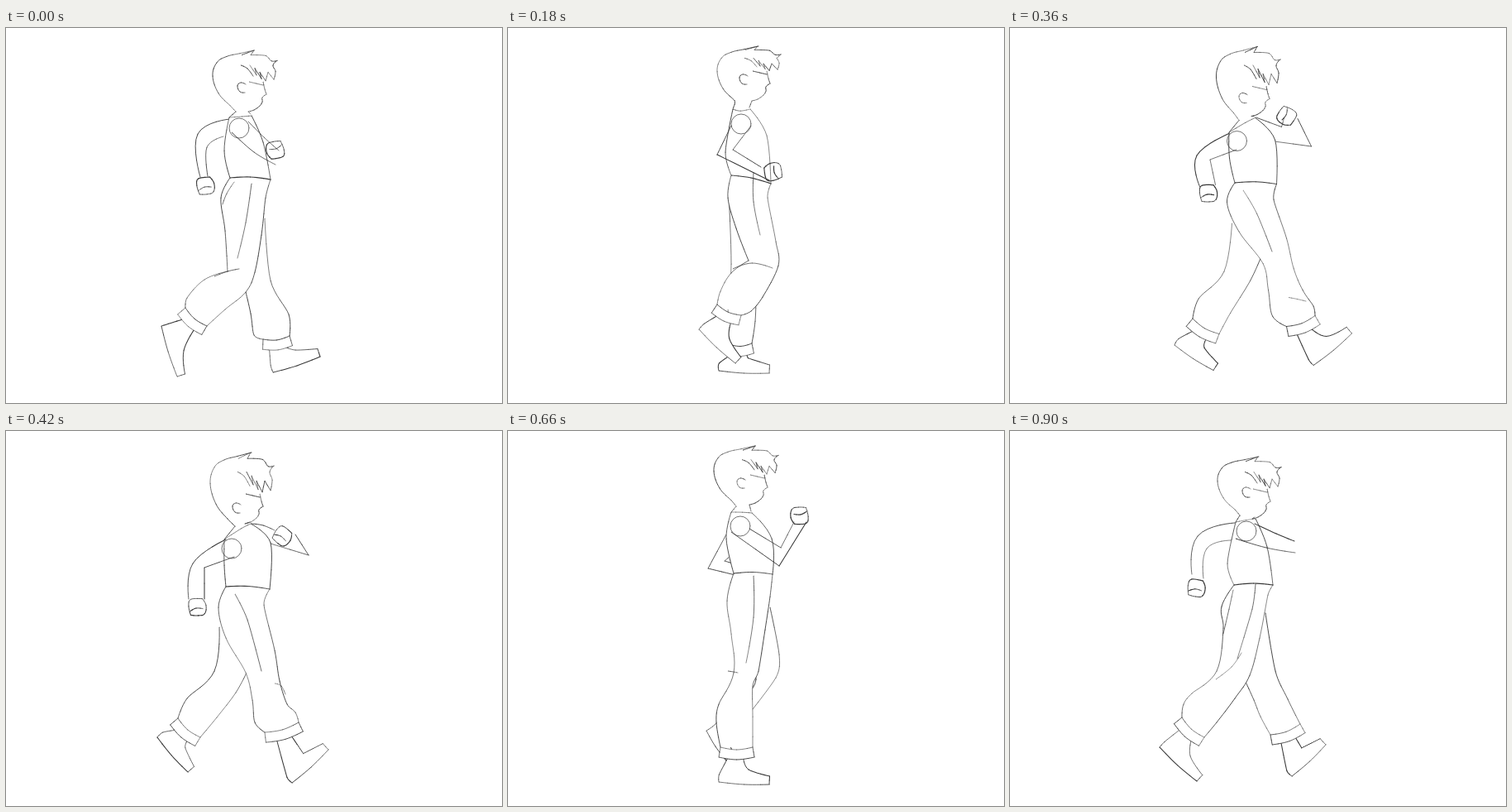
An HTML page with a canvas that plays this animation: 600x453 px, repeating every 0.96 s.

```html
<!DOCTYPE html>
<html lang="en">
<head>
<meta charset="utf-8">
<title>Walk cycle</title>
<style>
html, body { margin: 0; width: 100%; height: 100%; overflow: hidden; background: #fff; }
canvas { display: block; }
</style>
</head>
<body>
<canvas id="stage" width="600" height="453"></canvas>
<script>
const STEP = 60, STEPS = 16;
const poses = [];
const pose = (step, parts) => poses.push({ step, parts });

// head: face x, face y, hair top, skull left, nape x, nape y, ear x, ear y
// shoes: heel, toe; the other parts are x, y pairs along a line
pose(0, {
  head: [0, 0, 27, 250, 278, 101, 285, 72],
  back: [270, 108, 264, 148, 271, 181], chest: [297, 106, 311, 138, 320, 183],
  shoulder: [282, 121],
  nearIn: [293, 113, 312, 132, 330, 148], nearOut: [273, 126, 300, 150, 326, 165], nearHand: [326, 147],
  farIn: [263, 131, 243, 144, 244, 179], farOut: [271, 110, 232, 128, 235, 180], farHand: [241, 191],
  nearBack: [260, 205, 265, 245, 268, 294, 240, 304, 219, 326, 217, 338],
  nearFront: [314, 205, 309, 250, 301, 295, 290, 319, 265, 340, 243, 360],
  farBack: [290, 319, 296, 345, 300, 371, 311, 376],
  farFront: [313, 230, 320, 305, 342, 346, 343, 372],
  nearShoe: [188, 360, 207, 421], farShoe: [323, 416, 380, 397],
  crease: [297, 188, 290, 235, 280, 278], fold: [252, 300, 268, 294, 282, 291],
  pocket: [276, 186, 267, 200, 262, 213]
});
pose(3, {
  head: [2, -13, 22, 253, 273, 95, 285, 62],
  back: [272, 98, 263, 150, 270, 178], chest: [293, 98, 313, 130, 318, 188],
  shoulder: [282, 116],
  nearIn: [294, 118, 272, 147, 306, 168], nearOut: [270, 118, 253, 153, 316, 184], nearHand: [321, 174],
  farIn: [285, 120, 276, 148, 290, 160], farOut: [272, 120, 266, 150, 285, 172], farHand: [302, 169],
  nearBack: [266, 205, 276, 242, 291, 281, 270, 296, 257, 318, 253, 334],
  nearFront: [314, 205, 324, 258, 327, 287, 308, 325, 294, 342, 282, 347],
  farBack: [267, 200, 270, 285, 266, 345, 267, 382],
  farFront: [300, 250, 300, 320, 299, 354, 295, 381],
  nearShoe: [231, 364, 275, 405], farShoe: [255, 414, 316, 417],
  crease: [297, 175, 297, 210, 305, 250], fold: [272, 291, 295, 284, 320, 290]
});
pose(5, {
  head: [2, 0, 19, 252, 277, 108, 285, 76],
  back: [266, 121, 267, 152, 278, 186], chest: [297, 105, 321, 135, 326, 186],
  shoulder: [276, 131],
  nearIn: [272, 142, 244, 153, 257, 176], nearOut: [264, 124, 226, 148, 238, 180], nearHand: [248, 187],
  farIn: [298, 104, 346, 125, 338, 98], farOut: [320, 138, 363, 136, 346, 94], farHand: [335, 85],
  nearBack: [268, 208, 288, 242, 322, 277, 327, 308, 334, 344, 356, 357],
  nearFront: [326, 205, 344, 243, 355, 278, 368, 303, 384, 332, 384, 343],
  farBack: [279, 235, 266, 298, 238, 330, 234, 355],
  farFront: [316, 262, 303, 295, 278, 343, 271, 369],
  nearShoe: [388, 390, 437, 353], farShoe: [215, 396, 272, 415],
  crease: [287, 195, 305, 220, 325, 250], fold: [349, 346, 362, 347, 378, 342]
});
pose(7, {
  head: [-4, 11, 26, 247, 277, 115, 279, 93],
  back: [264, 131, 264, 162, 266, 188], chest: [296, 112, 320, 135, 319, 191],
  shoulder: [273, 142],
  nearIn: [276, 152, 240, 165, 240, 203], nearOut: [266, 131, 226, 160, 221, 203], nearHand: [231, 213],
  farIn: [297, 112, 311, 114, 325, 120], farOut: [320, 136, 366, 150, 350, 125], farHand: [334, 127],
  nearBack: [257, 213, 266, 250, 290, 292, 298, 325, 301, 352, 313, 364],
  nearFront: [312, 210, 325, 265, 331, 302, 340, 330, 350, 340, 354, 352],
  farBack: [258, 237, 252, 290, 219, 323, 208, 347],
  farFront: [292, 290, 278, 316, 255, 346, 235, 370],
  nearShoe: [346, 425, 390, 385], farShoe: [183, 370, 220, 412],
  crease: [277, 197, 292, 228, 309, 290], fold: [325, 305, 333, 308, 338, 318]
});
pose(11, {
  head: [-1, -12, 18, 249, 276, 91, 282, 63],
  back: [270, 98, 264, 130, 273, 172], chest: [295, 99, 319, 130, 320, 173],
  shoulder: [281, 115],
  nearIn: [292, 118, 330, 141, 346, 110], nearOut: [270, 122, 328, 163, 361, 110], nearHand: [353, 102],
  farIn: [270, 150, 262, 157, 272, 160], farOut: [264, 125, 242, 166, 275, 174], farHand: [290, 160],
  nearBack: [265, 205, 270, 245, 273, 292, 255, 330, 252, 352, 257, 382],
  nearFront: [317, 200, 311, 240, 303, 290, 296, 308, 296, 345, 296, 382],
  farBack: [290, 270, 300, 300, 285, 322, 268, 335],
  farFront: [317, 213, 328, 270, 324, 298, 285, 350],
  nearShoe: [255, 424, 316, 427], farShoe: [240, 362, 264, 398],
  crease: [297, 175, 297, 225, 288, 280], fold: [266, 290, 273, 291, 278, 292]
});
pose(13, {
  head: [0, -6, 17, 252, 277, 97, 284, 70],
  back: [268, 105, 266, 145, 271, 178], chest: [297, 103, 313, 134, 322, 174],
  shoulder: [284, 117],
  nearIn: [296, 106, 330, 113, 326, 100], nearOut: [275, 128, 350, 132, 343, 98], nearHand: [331, 95],
  farIn: [268, 130, 235, 138, 219, 160], farOut: [267, 109, 222, 128, 208, 149], farHand: [209, 161],
  nearBack: [260, 210, 264, 245, 256, 290, 238, 318, 222, 342, 220, 366],
  nearFront: [316, 195, 306, 245, 296, 282, 270, 328, 257, 355, 254, 375],
  farBack: [300, 272, 321, 305, 325, 336, 341, 366],
  farFront: [318, 213, 345, 265, 356, 320, 373, 351],
  nearShoe: [209, 409, 265, 426], farShoe: [376, 404, 417, 366],
  crease: [298, 177, 295, 220, 283, 278], fold: [248, 297, 262, 299, 284, 292],
  pocket: [271, 183, 263, 200, 263, 212]
});
pose(15, {
  head: [0, 5, 31, 251, 278, 102, 286, 74],
  back: [273, 110, 263, 160, 271, 186], chest: [297, 106, 311, 140, 318, 186],
  shoulder: [286, 121],
  nearIn: [296, 112, 322, 124, 344, 133], nearOut: [273, 130, 310, 141, 345, 147],
  farIn: [268, 132, 238, 142, 234, 178], farOut: [272, 111, 227, 127, 220, 173], farHand: [225, 190],
  nearBack: [256, 212, 258, 238, 250, 290, 220, 317, 210, 330, 208, 346],
  nearFront: [312, 198, 302, 250, 290, 295, 272, 323, 250, 352, 235, 370],
  farBack: [285, 303, 295, 325, 303, 345, 315, 367],
  farFront: [309, 220, 321, 290, 336, 324, 351, 354],
  nearShoe: [181, 382, 226, 423], farShoe: [341, 417, 382, 379],
  crease: [297, 185, 293, 215, 275, 275], fold: [249, 300, 268, 285, 280, 268],
  pocket: [270, 192, 265, 215, 258, 245]
});

// Shared head shapes; hair heights are percentages.
const SKULL = [50, 0, 33, 5, 17, 10, 5, 20, 0, 42, 7, 70, 21, 90];
const FRINGE = [285, 14, 300, 0, 296, 14, 314, 16, 321, 32, 328, 31, 323, 45, 326, 64, 324, 88,
  317, 66, 314, 92, 307, 66, 309, 86, 301, 54, 303, 75, 295, 45];
const LOCK = [284, 45, 292, 55, 299, 78];
const FACE = [311, 65, 313, 74, 315, 80, 310, 84, 310, 89, 307, 94, 300, 99, 293, 101];
const EAR = [4, 6, -2, 5, -5, -2, -1, -6, 5, -4];
const FIST = [-10, -7, -2, -11, 8, -9, 10, -1, 9, 8, -2, 10, -10, 7, -10, -7];
const THUMB = [2, -7, 1, 1, 4, 8];

const lerp = (a, b, u) => a + (b - a) * u;
const mix = (p, q, u) => [lerp(p[0], q[0], u), lerp(p[1], q[1], u)];
const add = (p, d, k = 1) => [p[0] + d[0] * k, p[1] + d[1] * k];
const dist = (a, b) => Math.hypot(b[0] - a[0], b[1] - a[1]) || 1;
const unit = (a, b) => [(b[0] - a[0]) / dist(a, b), (b[1] - a[1]) / dist(a, b)];
const last = list => list[list.length - 1];
const pairs = (flat, place = (x, y) => [x, y]) => {
  const out = [];
  for (let i = 0; i < flat.length; i += 2) out.push(place(flat[i], flat[i + 1]));
  return out;
};

// Smooth curve through the points; sharp turns stay corners.
function smooth(pts) {
  const tangent = i => {
    const a = pts[i - 1], b = pts[i], c = pts[i + 1];
    if (!a || !c) return [0, 0];
    const d = unit(a, b), e = unit(b, c);
    if (d[0] * e[0] + d[1] * e[1] < 0.35) return [0, 0];
    const k = Math.min(dist(a, b), dist(b, c)) * 1.2, t = unit(a, c);
    return [t[0] * k, t[1] * k];
  };
  const out = [pts[0]];
  for (let i = 0; i < pts.length - 1; i++) {
    const m = tangent(i), n = tangent(i + 1);
    for (let j = 1; j <= 8; j++) {
      const t = j / 8;
      const p = mix(pts[i], pts[i + 1], t * t * (3 - 2 * t));
      out.push(add(add(p, m, t * (1 - t) ** 2), n, -t * t * (1 - t)));
    }
  }
  return out;
}

const ctx = document.getElementById('stage').getContext('2d');
ctx.lineCap = ctx.lineJoin = 'round';
ctx.strokeStyle = '#383838';

// Pencil line with gently varying pressure.
function ink(pts, width = 0.85) {
  const line = smooth(pts);
  for (let i = 0; i < line.length - 1; i += 4) {
    ctx.lineWidth = width * (0.88 + 0.2 * Math.sin(i * 0.13 + pts[0][0]));
    ctx.beginPath();
    line.slice(i, i + 5).forEach(p => ctx.lineTo(...p));
    ctx.stroke();
  }
}

function blank(...sides) {
  ctx.fillStyle = '#fff';
  ctx.beginPath();
  sides.flatMap(smooth).forEach(p => ctx.lineTo(...p));
  ctx.fill();
}

function leg(back, front, [heel, toe]) {
  const b = last(back), f = last(front), e = unit(b, f);
  const down = [-e[1] * 12, e[0] * 12], mid = mix(b, f, 0.5), ankle = add(mid, down);

  const d = unit(heel, toe);
  let n = [d[1], -d[0]];
  if ((ankle[0] - heel[0]) * n[0] + (ankle[1] - heel[1]) * n[1] < 0) n = [-n[0], -n[1]];
  const shoe = [add(ankle, e, -10), add(heel, n, 9), heel, add(mix(heel, toe, 0.5), n, -1.5), toe,
    add(toe, n, 10), add(mix(heel, toe, 0.57), n, 17), add(ankle, e, 8)];
  blank(shoe);
  ink(shoe, 1);

  blank(back, [...front].reverse());
  ink(back);
  ink(front);

  const cuff = [b, add(add(b, down), e, -2), add(mid, down, 1.25), add(add(f, down), e, 2), f,
    add(mid, down, 0.25), b];
  blank(cuff);
  ink(cuff);
}

function arm(inner, outer, hand, width) {
  ink(inner, width);
  ink(outer, width);
  if (!hand) return;
  const d = unit(mix(last(inner), last(outer), 0.5), hand);
  const turn = (x, y) => [hand[0] + d[0] * x - d[1] * y, hand[1] + d[1] * x + d[0] * y];
  ink(pairs(FIST, turn), 1.1);
  ink(pairs(THUMB, turn), 1.1);
}

function head([fx, fy, top, left, nx, ny, ex, ey], neck) {
  const brow = 67 + fy;
  const hair = (x, v) => [x + fx, lerp(top, brow, v / 100)];
  const face = (x, y) => [x + fx, y + fy];
  ink([...pairs(SKULL, (x, v) => [left + x, lerp(top, ny, v / 100)]), [nx, ny]]);
  ink(pairs(FRINGE, hair));
  ink(pairs(LOCK, hair));
  ink(pairs(FACE, face));
  ink([face(294, 65), face(311, 69)]);
  ink(pairs(EAR, (x, y) => [ex + x, ey + y]));
  ink([face(293, 101), add(neck, [-1, -2])]);
}

function draw(parts) {
  const p = {};
  for (const k in parts) p[k] = pairs(parts[k]);
  const hand = k => p[k] && p[k][0];
  const hipL = last(p.back), hipR = last(p.chest), nape = [parts.head[4], parts.head[5]];

  ctx.fillStyle = '#fff';
  ctx.fillRect(0, 0, 600, 453);
  leg(p.farBack, p.farFront, p.farShoe);
  arm(p.farIn, p.farOut, hand('farHand'));

  blank(p.back, [...p.chest].reverse());
  leg([hipL, ...p.nearBack], [hipR, ...p.nearFront], p.nearShoe);
  ink(p.back);
  ink(p.chest);
  ink([hipL, add(mix(hipL, hipR, 0.5), [0, -2]), hipR], 1.1);
  ink([nape, p.back[0]]);
  ink([p.back[0], add(mix(nape, p.chest[0], 0.4), [0, 4]), p.chest[0]], 0.6);
  for (const k of ['crease', 'fold', 'pocket']) if (p[k]) ink(p[k], 0.7);

  ctx.lineWidth = 0.7;
  ctx.beginPath();
  ctx.arc(...p.shoulder[0], 12, 0, 7);
  ctx.stroke();
  arm(p.nearIn, p.nearOut, hand('nearHand'), 1);
  head(parts.head, p.chest[0]);
}

function between(a, b, u) {
  const out = {}, closer = u < 0.5 ? a : b;
  for (const k of Object.keys({ ...a, ...b })) {
    if (a[k] && b[k]) out[k] = a[k].map((v, i) => lerp(v, b[k][i], u));
    else if (closer[k]) out[k] = closer[k];
  }
  return out;
}

function at(step) {
  const i = poses.findLastIndex(p => p.step <= step);
  const a = poses[i], b = poses[(i + 1) % poses.length];
  const span = (b.step - a.step + STEPS) % STEPS;
  return between(a.parts, b.parts, (step - a.step) / span);
}

let shown = -1;
function frame() {
  const step = Math.floor(performance.now() / STEP) % STEPS;
  if (step !== shown) draw(at(shown = step));
  requestAnimationFrame(frame);
}
frame();
</script>
</body>
</html>
```
